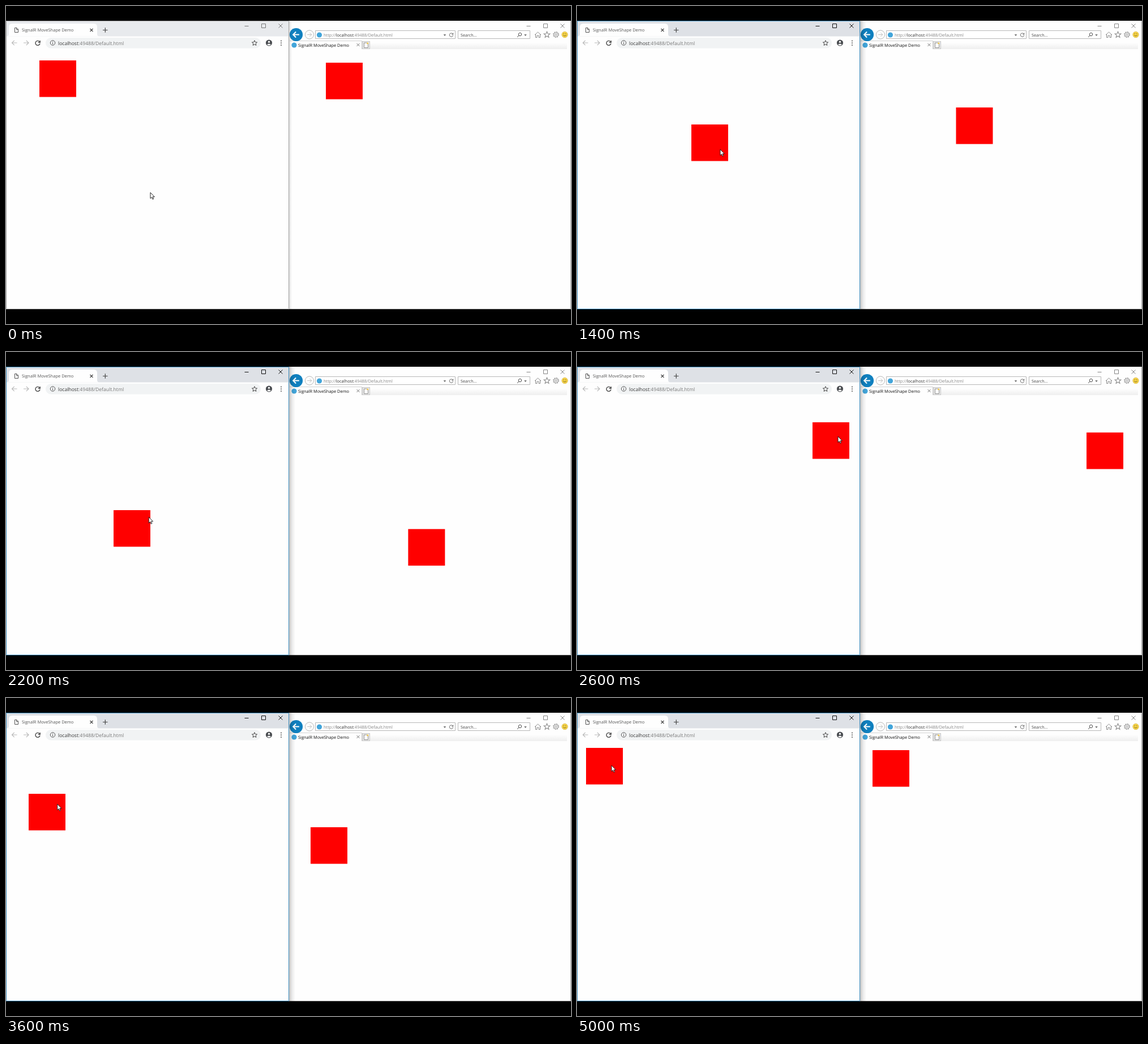
Write an HTML page that moves like this. It is 998 by 561 pixels and loops after 5200 ms.

```html
<!DOCTYPE html>
<html lang="en">
<head>
<meta charset="utf-8">
<title>SignalR MoveShape Demo</title>
<style>
  html, body { margin: 0; width: 100%; height: 100%; overflow: hidden; background: #000; }
  svg { display: block; width: 100%; height: 100%; }
  text { font-family: "Open Sans", "Noto Sans", sans-serif; text-rendering: geometricPrecision; white-space: pre; }
  .line { fill: none; stroke-width: 1; }
  #stage { --strip: #e8eaed; --edge: #a6a6a6; --controls: #777; --shade: .16; --reach: .5; }
  #stage.active { --strip: #dee1e6; --edge: #3f8fc0; --controls: #111; --shade: .24; --reach: 1; }
  #strip { fill: var(--strip); }
  #frame { stroke: var(--edge); }
  #controls { stroke: var(--controls); }
  #shadow { opacity: var(--shade); transform: translateX(500px) scaleX(var(--reach)); }
  .shape { fill: #f00; }
</style>
</head>
<body>
<svg id="stage" viewBox="0 0 998 561" preserveAspectRatio="none">
  <defs>
    <linearGradient id="fade">
      <stop offset="0" stop-color="#000"/>
      <stop offset=".45" stop-color="#000" stop-opacity=".35"/>
      <stop offset="1" stop-color="#000" stop-opacity="0"/>
    </linearGradient>
    <linearGradient id="tabRow" x2="0" y2="1">
      <stop offset="0" stop-color="#fefefe"/>
      <stop offset="1" stop-color="#eee"/>
    </linearGradient>
    <path id="cross" d="M-2.5-2.5 2.5 2.5M2.5-2.5-2.5 2.5"/>
    <path id="windowButtons" d="M-33.5.5h7M-3.5-3.5h7v7h-7zM26.5-3.5l7 7M33.5-3.5l-7 7"/>
    <path id="star" d="M0-4.6 1.3-1.5 4.6-1.3 2.1.9 2.9 4.1 0 2.3-2.9 4.1-2.1.9-4.6-1.3-1.3-1.5z"/>
    <path id="arrow" d="M4.5 0h-9M-.3-4.2-4.5 0-.3 4.2"/>
    <path id="reload" d="M3.2-2.4A4 4 0 1 0 4 .8M4.2-4.4v3.3H.9"/>
    <path id="caret" d="M-2.3-1.2h4.6L0 1.3z"/>
  </defs>

  <rect width="998" height="561"/>

  <!-- right window -->
  <rect x="500" y="26" width="498" height="509" fill="#fefefe"/>
  <path class="line" stroke="#aaa" d="M500 534.5h497.5V26"/>
  <use href="#windowButtons" x="953" y="35" class="line" stroke="#858585"/>
  <rect x="643" y="65" width="348" height="11" fill="url(#tabRow)"/>
  <path class="line" stroke="#d2d2d2" d="M501 61.5h127.5V76"/>
  <rect x="629.5" y="62.5" width="13" height="13" fill="#e9e9e9" stroke="#c6c6c6"/>
  <path fill="#fff" stroke="#777" stroke-width=".8" d="M632.5 65h5l2 2v6.5h-7z"/>
  <circle cx="638.8" cy="65.8" r="1.5" fill="#f0c64a"/>
  <circle cx="512.5" cy="50.5" r="11.6" fill="#1080bf"/>
  <use href="#arrow" transform="translate(512.5 50.5) scale(1.2)" class="line" stroke="#fff" stroke-width="1.6" style="stroke-width:1.6"/>
  <g class="line" stroke="#b7b7b7">
    <circle cx="536" cy="50.5" r="7.6"/>
    <use href="#arrow" transform="translate(536 50.5) scale(-.85 .85)"/>
    <path fill="#fff" d="M546.5 43.5h247v14h-247zM798.5 43.5h127v14h-127z"/>
  </g>
  <circle cx="553.5" cy="51" r="4.6" fill="#42a5da"/>
  <circle cx="509" cy="69" r="4.6" fill="#42a5da"/>
  <text x="561" y="54" font-size="7.42" fill="#858585">http://<tspan fill="#333">localhost</tspan>:49488/Default.html</text>
  <text x="803" y="54" font-size="7.2" fill="#444">Search...</text>
  <text x="516" y="71.8" font-size="7.4" fill="#111">SignalR MoveShape Demo</text>
  <use href="#cross" x="622" y="68.5" class="line" stroke="#777"/>
  <use href="#caret" x="775" y="51.5" fill="#555"/>
  <use href="#caret" x="917.5" y="51.5" fill="#555"/>
  <use href="#reload" transform="translate(786.5 51) scale(.8)" class="line" stroke="#444"/>
  <g class="line" stroke="#555"><circle cx="908" cy="50" r="2.7"/><path d="M906 52l-3 3"/></g>
  <g class="line" stroke="#8c8c8c">
    <path d="M934 51l5.5-5 5.5 5M935.5 50v5.5h2.5v-3.500h3v3.500h2.500V50"/>
    <use href="#star" transform="translate(955.5 50.500) scale(1.15)"/>
    <circle cx="971.5" cy="50.500" r="1.7"/>
    <circle cx="971.5" cy="50.500" r="4"/>
    <circle cx="971.5" cy="50.500" r="5" stroke-dasharray="2 1.93"/>
  </g>
  <circle cx="987" cy="50.500" r="5.2" fill="#f8d548" stroke="#c9a63a" stroke-width=".6"/>
  <path class="line" stroke="#6d5a20" style="stroke-width:.9" d="M985.300 48v1.600M988.700 48v1.600M984.200 51.500q2.800 3 5.600 0"/>
  <rect id="right" class="shape" width="65" height="64.5"/>
  <rect id="shadow" y="26" width="11" height="509" fill="url(#fade)"/>

  <!-- left window -->
  <rect y="26" width="500" height="509" fill="#fefefe"/>
  <rect id="strip" y="26" width="500" height="27.500"/>
  <path fill="#fefefe" d="M1 53.500q4 0 4-4V37q0-6 6-6h144q6 0 6 6v12.500q0 4 4 4z"/>
  <path class="line" stroke="#555" d="M15.500 38.500h3.500l2.500 2.500v5.500h-6zM18.500 38.500v3h3"/>
  <text x="28" y="45.300" font-size="7.5" fill="#555">SignalR MoveShape Demo</text>
  <use href="#cross" x="151" y="42.500" class="line" stroke="#444" style="stroke-width:1.2"/>
  <path class="line" stroke="#444" style="stroke-width:1.2" d="M171 42.500h8.500M175.300 38.300v8.500"/>
  <use id="controls" href="#windowButtons" x="455" y="35" class="line"/>
  <use href="#arrow" x="15" y="65" class="line" stroke="#b8b8b8" style="stroke-width:1.2"/>
  <use href="#arrow" transform="translate(35.500 65) scale(-1 1)" class="line" stroke="#b8b8b8" style="stroke-width:1.2"/>
  <use href="#reload" x="56" y="65.300" class="line" stroke="#444" style="stroke-width:1.4"/>
  <rect x="70" y="56" width="380" height="18.500" rx="9.250" fill="#f1f3f4"/>
  <g class="line" stroke="#555"><circle cx="82.500" cy="65" r="4.200"/><path d="M82.500 64.500v3M82.500 62.500v1"/></g>
  <text x="92" y="68.500" font-size="8.6" fill="#777"><tspan fill="#333">localhost</tspan>:49488/Default.html</text>
  <use href="#star" x="439" y="65.300" class="line" stroke="#444"/>
  <circle cx="464.500" cy="65" r="5.600" fill="#4a4d51"/>
  <circle cx="464.500" cy="63.200" r="1.700" fill="#fff"/>
  <path fill="#fff" d="M461 68q3.500-3 7 0-3.500 3-7 0z"/>
  <g fill="#555"><circle cx="486" cy="61.500" r="1"/><circle cx="486" cy="65.300" r="1"/><circle cx="486" cy="69" r="1"/></g>
  <path id="frame" class="line" d="M.5 26.500h499v508H.5z"/>
  <rect id="left" class="shape" width="65" height="64.5"/>

  <path id="cursor" fill="#fff" stroke="#111" stroke-width=".9" stroke-linejoin="round" d="M0 0v10.500l2.400-2.200L4 12l1.700-.7-1.600-3.600h3.300z"/>
</svg>
<script>
  const LOOP = 5200, STEP = 200;
  const GRAB = 900, RELEASE = 4700, ACTIVATE = 800;
  const GRIP = { x: 35, y: 31 };
  const LEFT_LAG = 40, RIGHT_LAG = 140;

  // Pointer path: [ms, x, y]
  const path = [
    [0, 255, 329], [700, 94, 127], [900, 94, 127], [1080, 115, 142],
    [1260, 198.5, 206], [1360, 237, 240], [1400, 253, 253], [1640, 325, 335],
    [1860, 307, 353], [1960, 264, 357], [2000, 248, 357], [2160, 225, 310],
    [2460, 429, 169], [2560, 451, 155], [2600, 461, 149], [2760, 440, 210],
    [2900, 300, 330], [3060, 183, 392], [3160, 175, 399], [3200, 173, 402],
    [3330, 90, 345], [3460, 67, 255], [3560, 75, 200], [3700, 130, 155],
    [3860, 149, 150], [3960, 110, 138], [4000, 93, 129], [4120, 62, 121],
    [4260, 51, 119], [4700, 51, 119], [4800, 56, 117], [5000, 61, 119]
  ];

  const byId = id => document.getElementById(id);
  const stage = byId("stage");

  function pointerAt(time) {
    const next = path.findIndex(knot => knot[0] > time);
    if (next < 0) return path[path.length - 1].slice(1);
    const [t0, x0, y0] = path[next - 1], [t1, x1, y1] = path[next];
    const k = (time - t0) / (t1 - t0);
    return [x0 + (x1 - x0) * k, y0 + (y1 - y0) * k];
  }

  function shapeAt(time) {
    const [x, y] = pointerAt(Math.min(RELEASE, Math.max(GRAB, time)));
    return [x - GRIP.x, y - GRIP.y];
  }

  function place(id, [x, y], dx = 0, dy = 0) {
    byId(id).setAttribute("transform", `translate(${x + dx} ${y + dy})`);
  }

  function draw(now) {
    const time = Math.floor((now % LOOP) / STEP) * STEP;
    stage.classList.toggle("active", time >= ACTIVATE);
    place("cursor", pointerAt(time));
    place("left", shapeAt(time - LEFT_LAG));
    place("right", shapeAt(time - RIGHT_LAG), 506, 4);
  }

  const start = performance.now();
  function tick() {
    draw(performance.now() - start);
    requestAnimationFrame(tick);
  }
  tick();
</script>
</body>
</html>
```
